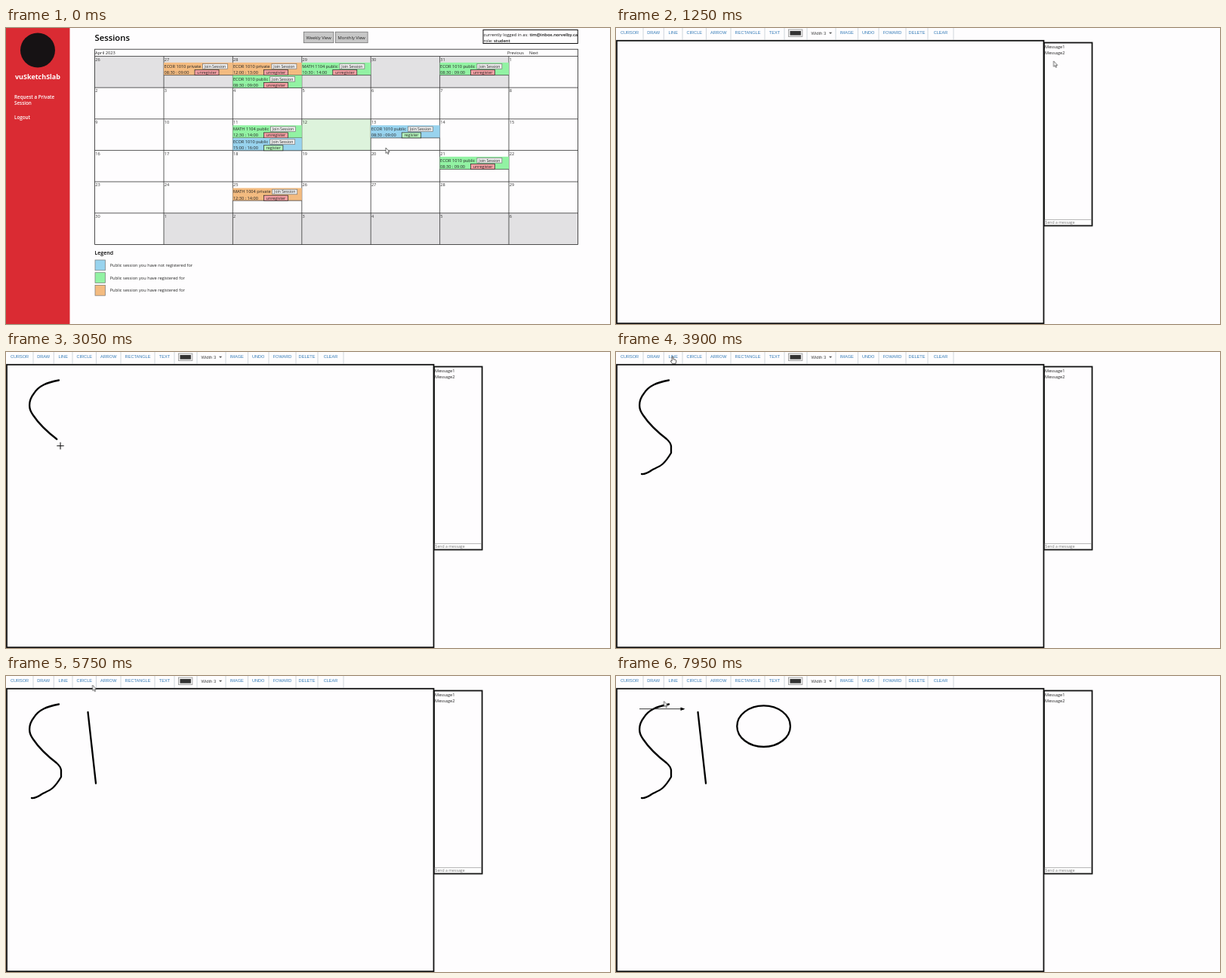
Write an HTML page that moves like this. It is 800 px wide and 393 px high and loops after 8000 ms.

```html
<!DOCTYPE html>
<html lang="en">
<head>
<meta charset="utf-8">
<title>Sessions and whiteboard</title>
<style>
html, body { margin: 0; height: 100%; overflow: hidden; background: #fefdfe; }
svg { display: block; width: 100%; height: 100%; font-family: "Open Sans", "Noto Sans", sans-serif; }
text { white-space: pre; }
.bold { font-weight: 600; }
.ink { fill: none; stroke: #000; stroke-width: 2.3; stroke-linecap: round; stroke-linejoin: round; }

/* Every animation shares one 8 s clock; 1% is 80 ms. */
.anim { animation: 8s linear infinite; }
.step { animation: 8s step-end infinite; }

#calendar { animation-name: calendar; }
#board { animation-name: board; }
#status { animation-name: status; }
@keyframes calendar { 0% { opacity: 1 } 11.6%, 100% { opacity: 0 } }
@keyframes board { 0% { opacity: 0 } 11.6%, 100% { opacity: 1 } }
@keyframes status { 0% { opacity: 0 } 10.6%, 100% { opacity: 1 } }

#cursor { animation-name: move; }
@keyframes move {
  0%, 2.5% { transform: translate(503px, 159px) }
  10%, 11.6% { transform: translate(537px, 132px) }
  11.61%, 15.6% { transform: translate(582px, 44px) }
  20% { transform: translate(300px, 26px) }
  25%, 29.5% { transform: translate(49px, 6px) }
  32.5%, 33.75% { transform: translate(70px, 38px) }
  34.8% { transform: translate(43px, 48px) }
  36.25% { transform: translate(31px, 72px) }
  37% { transform: translate(44px, 94px) }
  38.125% { transform: translate(72px, 124px) }
  39.2% { transform: translate(73px, 134px) }
  41.25%, 42.5% { transform: translate(34px, 162px) }
  46.25%, 50.6% { transform: translate(75px, 6px) }
  55%, 56.25% { transform: translate(108px, 48px) }
  57.5% { transform: translate(113px, 57px) }
  60% { transform: translate(126px, 81px) }
  63.1%, 64.4% { transform: translate(119px, 142px) }
  68.1% { transform: translate(104px, 30px) }
  69.4%, 71.3% { transform: translate(104px, 6px) }
  74.4%, 75.6% { transform: translate(160px, 38px) }
  78.75% { transform: translate(210px, 72px) }
  81.25%, 82.5% { transform: translate(230px, 93px) }
  85%, 86% { transform: translate(135px, 6px) }
  88.1% { transform: translate(31px, 43px) }
  89.4% { transform: translate(66px, 43px) }
  91.25%, 92.5% { transform: translate(91px, 43px) }
  95%, 95.6% { transform: translate(174px, 6px) }
  99.2%, 100% { transform: translate(63.5px, 33.5px) }
}
#pointer { animation-name: pointer; }
#hand { animation-name: hand; }
#cross { animation-name: cross; }
@keyframes pointer {
  0%, 15.6%, 51%, 71.6%, 86.5%, 96% { opacity: 1 }
  10%, 25%, 68.8%, 84.2%, 93.8% { opacity: 0 }
  100% { opacity: 1 }
}
@keyframes hand {
  0%, 11.6%, 30.5%, 51%, 71.6%, 86.5%, 96%, 100% { opacity: 0 }
  10%, 25%, 45%, 68.8%, 84.2%, 93.8% { opacity: 1 }
}
@keyframes cross { 0%, 45%, 100% { opacity: 0 } 30.5% { opacity: 1 } }

#curve { stroke-dasharray: 100 200; animation-name: curve, afterCurve; animation-timing-function: linear, step-end; }
@keyframes curve {
  0%, 33.75% { stroke-dashoffset: 100 }
  36.25% { stroke-dashoffset: 69 }
  38.125% { stroke-dashoffset: 38 }
  39.2% { stroke-dashoffset: 28 }
  41.25%, 100% { stroke-dashoffset: 0 }
}
@keyframes afterCurve { 0% { opacity: 0 } 33.8%, 100% { opacity: 1 } }

#line { animation-name: line, afterLine; animation-timing-function: linear, step-end; }
@keyframes line {
  0%, 56.25% { d: path("M108.5 48L108.5 48") }
  57.5% { d: path("M108.5 48L112 54") }
  60% { d: path("M108.5 48L123.5 72.5") }
  63.1%, 100% { d: path("M108.5 48L119 142.5") }
}
@keyframes afterLine { 0% { opacity: 0 } 56.3%, 100% { opacity: 1 } }

#oval { transform-origin: 160px 39px; animation-name: oval, afterOval; animation-timing-function: linear, step-end; }
#oval * { vector-effect: non-scaling-stroke; }
#selection { animation-name: selection; }
@keyframes oval {
  0%, 75.6% { transform: scale(.01) }
  78.75% { transform: scale(.71, .61) }
  81.25%, 100% { transform: scale(1) }
}
@keyframes afterOval { 0% { opacity: 0 } 75.7%, 100% { opacity: 1 } }
@keyframes selection { 0% { opacity: 1 } 82.5%, 100% { opacity: 0 } }

#arrow { animation-name: afterArrow; }
#shaft { transform-origin: 31px 43.7px; animation-name: shaft; }
#tip { animation-name: tip; }
@keyframes afterArrow { 0% { opacity: 0 } 88.2%, 100% { opacity: 1 } }
@keyframes shaft {
  0%, 88.1% { transform: scaleX(0) }
  89.4% { transform: scaleX(.57) }
  91.25%, 100% { transform: scaleX(1) }
}
@keyframes tip {
  0%, 88.1% { transform: translate(-60px, 0) }
  89.4% { transform: translate(-25px, 0) }
  91.25%, 100% { transform: translate(0, 0) }
}
</style>
</head>
<body>
<svg viewBox="0 0 800 393" preserveAspectRatio="none">
  <g id="calendar" class="step">
    <rect width="84.5" height="393" fill="#da2b33"/>
    <circle cx="42" cy="29.5" r="23" fill="#161214"/>
    <g fill="#fff" class="bold">
      <text x="42" y="68" font-size="9" font-weight="700" text-anchor="middle">vuSketchSlab</text>
      <g font-size="6.3">
        <text x="11" y="93.5">Request a Private</text>
        <text x="11" y="102">Session</text>
        <text x="11" y="121">Logout</text>
      </g>
    </g>
    <text x="117.5" y="17" font-size="11.3" class="bold">Sessions</text>
    <rect x="632" y="2.5" width="125.3" height="18" fill="none" stroke="#111"/>
    <g font-size="5.8" fill="#111">
      <text x="632.5" y="10.8">currently logged in as: <tspan class="bold">tim@inbox.norvelby.ca</tspan></text>
      <text x="632.5" y="18.6">role: <tspan class="bold">student</tspan></text>
    </g>
    <g id="views"></g>
    <g id="grid"></g>
    <g id="events"></g>
    <text x="117.5" y="301" font-size="7" class="bold">Legend</text>
    <g id="legend"></g>
    <rect id="status" class="step" y="391" width="63" height="2" fill="#333"/>
  </g>

  <g id="board" class="step">
    <g id="tools"></g>
    <rect x="1" y="16.8" width="565.5" height="375.4" fill="none" stroke="#111" stroke-width="1.8"/>
    <rect x="567" y="19.5" width="63.6" height="243" fill="none" stroke="#111" stroke-width="1.8"/>
    <g font-size="5.7" fill="#222">
      <text x="568" y="27">Message1</text>
      <text x="568" y="35.4">Message2</text>
    </g>
    <rect x="568" y="254.5" width="61.6" height="6.8" fill="#fff" stroke="#999" stroke-width=".7"/>
    <text x="568.6" y="260" font-size="5.2" fill="#777">Send a message</text>

    <path id="curve" class="ink anim" pathLength="100" d="M70 37.5C62 39 55 41 50 43.5C45 46 40 50 37 55C33 60 31 65 31.2 71C31 76 33 80 36 84C44 96 56 107 67 115.5C71 119 72.5 121 73 125L73 134C70 139 66 145 62 148.5C58 152 53 154 48 156.5C43 160 39 162.5 34 162"/>
    <path id="line" class="ink anim" d="M108.5 48L119 142.5"/>
    <g id="oval" class="anim">
      <rect id="selection" class="step" x="159.5" y="38.3" width="70.3" height="54.7" fill="#cbcbfb"/>
      <ellipse class="ink" cx="195.6" cy="66.7" rx="35.3" ry="27.3"/>
      <ellipse class="step" style="animation-name:selection" cx="195.6" cy="66.7" rx="35.3" ry="27.3" fill="none" stroke="#111" stroke-width="3" stroke-dasharray="1 1.2"/>
    </g>
    <g id="arrow" class="step">
      <path id="shaft" class="anim" d="M31 43.7H90" stroke="#222" stroke-width=".9"/>
      <path id="tip" class="anim" d="M85.5 41.5L91.5 43.7L85.5 46Z"/>
    </g>
  </g>

  <g id="cursor" class="anim">
    <path id="pointer" class="step" d="M0 0V7.4L1.7 5.9L2.9 8.5L4 8L2.9 5.5H5.1Z" fill="#fff" stroke="#333" stroke-width=".7"/>
    <path id="hand" class="step" d="M-.9 .8Q0 -.6 .9 .8V3.6L4.2 4.5Q5 4.9 4.8 6L4 9.6H-.3L-2.7 6.2Q-2.6 4.9 -.9 6Z" fill="#fff" stroke="#333" stroke-width=".8"/>
    <path id="cross" class="step" d="M-4.7 .5H4.7M0 -4.2V5.2" stroke="#111" stroke-width="1.1"/>
  </g>
</svg>
<script>
const $ = id => document.getElementById(id);
const rect = (x, y, w, h, fill, stroke = "none", sw = .8) =>
  `<rect x="${x}" y="${y}" width="${w}" height="${h}" fill="${fill}" stroke="${stroke}" stroke-width="${sw}"/>`;
const text = (x, y, s, size = 5.7, fill = "#222", more = "") =>
  `<text x="${x}" y="${y}" font-size="${size}" fill="${fill}" ${more}>${s}</text>`;
const middle = 'text-anchor="middle"';
const button = (x, y, w, h, label, fill, stroke, size) =>
  rect(x, y, w, h, fill, stroke, .7) + text(x + w / 2, y + h / 2 + size * .36, label, size, "#222", middle);

const colors = { open: "#98d3ee", joined: "#92f2a3", private: "#f3bb80" };
const left = 117.6, top0 = 37.5, cellW = 91.4, cellH = 41.65;

$("views").innerHTML =
  button(394.3, 5.2, 39.6, 14.5, "Weekly View", "#c7c7c7", "#666", 5.8) +
  button(436.3, 5.2, 42.8, 14.5, "Monthly View", "#c7c7c7", "#666", 5.8);

function buildGrid() {
  let cells = "", days = "", lines = "";
  for (let i = 0; i < 42; i++) {
    const x = left + i % 7 * cellW, y = top0 + Math.floor(i / 7) * cellH;
    const day = i < 6 ? 26 + i : i < 36 ? i - 5 : i - 35;
    const outside = i < 6 || i > 35;
    if (outside || day === 12) cells += rect(x, y, cellW, cellH, outside ? "#e2e1e3" : "#ddf3dc");
    days += text(x + .7, y + 6.3, day, 5.6, "#333");
  }
  for (let c = 1; c < 7; c++) lines += `M${left + c * cellW} ${top0}v${cellH * 6}`;
  for (let r = 0; r < 6; r++) lines += `M${left} ${top0 + r * cellH}h${cellW * 7}`;
  return cells + `<path d="${lines}" stroke="#333" stroke-width=".8"/>` +
    rect(left, 28.2, cellW * 7, 259.2, "none", "#222") + days +
    text(118, 35, "April 2023") + text(664, 35, "Previous", 5.5) + text(693, 35, "Next", 5.5);
}
$("grid").innerHTML = buildGrid();

function session(col, row, slot, course, kind, hours) {
  const x = left + col * cellW, y = top0 + row * cellH + 8.4 + slot * 16.9;
  const scope = kind === "private" ? "private" : "public";
  const joinX = x + 49.3 + (scope === "private" ? 2.2 : 0) + (course[0] === "M" ? .8 : 0);
  const action = kind === "open"
    ? button(x + 41, y + 9.7, 25.5, 7, "register", "#b5f7bd", "#222", 5.4)
    : button(x + 41, y + 9.7, 32, 7, "unregister", "#f6a0a4", "#222", 5.4);
  return rect(x, y, cellW, 16.7, colors[kind]) +
    `<path d="M${x} ${y + 16.7}h${cellW}" stroke="#333" stroke-width=".7"/>` +
    text(x + .5, y + 6.7, `${course} ${scope}`, 5.65) +
    text(x + .5, y + 15.2, hours, 5.6) +
    button(joinX, y + 1.7, 33, 6.6, "Join Session", "#ededed", "#777", 5.1) + action;
}
$("events").innerHTML = [
  [1, 0, 0, "ECOR 1010", "private", "08:30 : 09:00"],
  [2, 0, 0, "ECOR 1010", "private", "12:00 : 13:00"],
  [2, 0, 1, "ECOR 1010", "joined", "08:30 : 09:00"],
  [3, 0, 0, "MATH 1104", "joined", "10:30 : 14:00"],
  [5, 0, 0, "ECOR 1010", "joined", "08:30 : 09:00"],
  [2, 2, 0, "MATH 1104", "joined", "12:30 : 14:00"],
  [2, 2, 1, "ECOR 1010", "open", "15:00 : 16:00"],
  [4, 2, 0, "ECOR 1010", "open", "08:30 : 09:00"],
  [5, 3, 0, "ECOR 1010", "joined", "08:30 : 09:00"],
  [2, 4, 0, "MATH 1004", "private", "12:30 : 14:00"]
].map(s => session(...s)).join("");

$("legend").innerHTML = Object.values(colors).map((color, i) =>
  rect(118, 308 + i * 16.7, 13.6, 13.8, color, "#777", .7) +
  text(137.7, 317 + i * 16.7, `Public session you have ${i ? "" : "not "}registered for`, 5.65)).join("");

// Labels with the right edge of each toolbar button
const tools = [["CURSOR", 36], ["DRAW", 63.3], ["LINE", 88], ["CIRCLE", 119.5], ["ARROW", 152], ["RECTANGLE", 197],
  ["TEXT", 223], ["", 253], ["", 291], ["IMAGE", 320.5], ["UNDO", 348], ["FOWARD", 384], ["DELETE", 413], ["CLEAR", 447]];
const sans = 'font-family="Liberation Sans, sans-serif"';
let edge = 0;
$("tools").innerHTML = tools.map(([label, right]) => {
  const mid = (edge + right) / 2;
  edge = right;
  return text(mid, 8.4, label, 5.6, "#337ab7", `${middle} ${sans}`) +
    `<path d="M${right} 0V15.5" stroke="#c4ccd4" stroke-width=".8"/>`;
}).join("") +
  rect(228.5, 2, 18.4, 9.6, "#eee", "#888", .7) + rect(230.5, 4, 14.4, 5.6, "#333") +
  text(258.5, 8.6, "Width 3", 5.8, "#444", sans) + '<path d="M282 5.8h4.2l-2.1 2.3z" fill="#555"/>';
</script>
</body>
</html>
```
